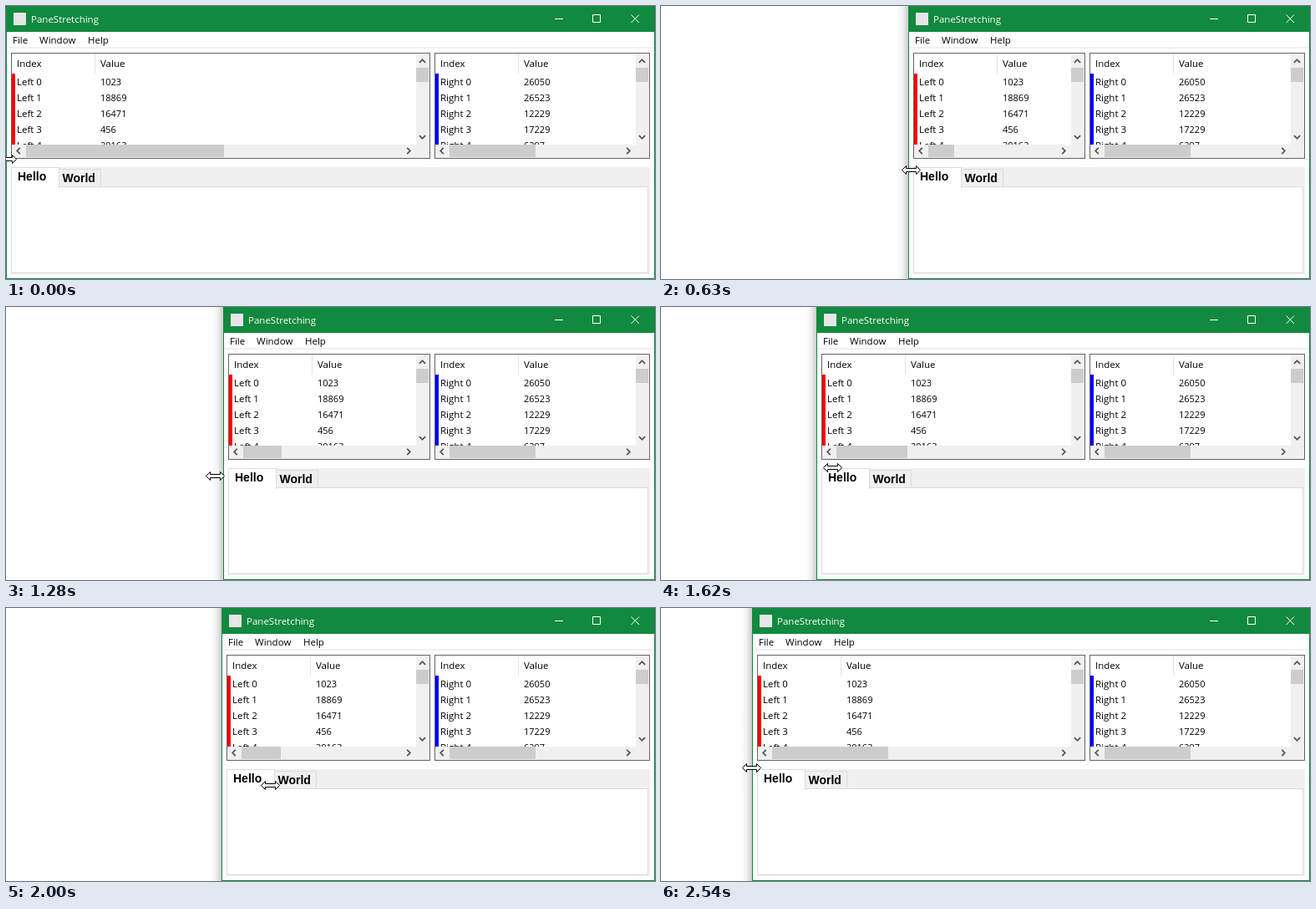
An HTML page that plays this animation: 777x327 px, repeating every 2.62 s.

```html
<!DOCTYPE html>
<html lang="en">
<head>
<meta charset="utf-8">
<title>Resizable window</title>
<style>
  html, body { margin: 0; width: 100%; height: 100%; overflow: hidden; background: #fff; }
  svg { display: block; width: 777px; height: 327px; }
  rect { shape-rendering: crispEdges; }
  text { font: 11.5px "Open Sans", "Noto Sans", sans-serif; white-space: pre; }
  .num { font-size: 11px; }
  .tab { font: bold 14px "Liberation Sans", Arial, sans-serif; }
  .chev { fill: none; stroke: #505050; stroke-width: 1.7; }
  .ctl { fill: none; stroke: #fff; }
</style>
</head>
<body>
<svg id="stage" viewBox="0 0 777 327"></svg>
<script>
const LOOP = 2620;
const GREEN = '#11893e', GREY = '#f0f0f0', THUMB = '#cdcdcd', EDGE = '#dcdcdc', FRAME = '#646464';

// time, window left edge, pointer x, pointer y
const KEYS = [
  [0, 0, 1.5, 183.5],
  [60, 6, 10, 184],
  [300, 150, 160, 190],
  [530, 279, 282, 195],
  [630, 296, 299.5, 196.5],
  [780, 338, 335, 196],
  [880, 264, 193.5, 193.5],
  [950, 135, 104, 193],
  [1030, 96, 95.5, 194],
  [1085, 96, 95.5, 194],
  [1190, 190, 215, 199],
  [1280, 260, 250.5, 202.5],
  [1370, 170, 150, 197],
  [1480, 108, 110, 192],
  [1620, 185, 204.5, 192.5],
  [1710, 254, 255, 196],
  [1860, 62, 60.5, 202],
  [2000, 257, 316.5, 212.5],
  [2065, 331, 325, 210],
  [2170, 184, 178, 200],
  [2300, 140, 136, 194],
  [2540, 109, 108.5, 191.5],
  [2620, 109, 108.5, 191.5]
];

const rect = (x, y, w, h, fill, more = '') =>
  `<rect x="${x}" y="${y}" width="${w}" height="${h}" fill="${fill}" ${more}/>`;
const box = (x, y, w, h, fill, stroke) => rect(x, y, w, h, stroke) + rect(x + 1, y + 1, w - 2, h - 2, fill);
const text = (x, y, s, cls = '', fill = '#000') => `<text x="${x}" y="${y}" class="${cls}" fill="${fill}">${s}</text>`;
const chev = (x, y, turn) =>
  `<path class="chev" d="M-3.6 1.8L0 -1.8L3.6 1.8" transform="translate(${x} ${y}) rotate(${turn})"/>`;

// Rectangles whose left side follows the window while the right side stays
const stretch = (x, y, right, h, fill) =>
  rect(x, y, right - x, h, fill, `class="stretch" data-x="${x}" data-r="${right}"`);
const stretchBox = (x, y, right, h, fill, stroke) =>
  stretch(x, y, right, h, stroke) + stretch(x + 1, y + 1, right - 1, h - 2, fill);

// Parts of a list anchored to its left side
function listBody(x, name, color, values) {
  let s = rect(x + 100, 57, 1, 24, '#e5e5e5') + rect(x + 1, 81, 4, 85, color) +
    text(x + 7, 73, 'Index') + text(x + 107, 73, 'Value');
  s += '<g clip-path="url(#rows)">';
  values.forEach((v, i) => {
    const y = 95 + 19 * i;
    s += text(x + 7, y, `${name} ${i}`) + text(x + 107, y, v, 'num');
  });
  return s + '</g>' + chev(x + 9, 173.5, -90);
}

// Parts of a list anchored to its right side
const listBars = r =>
  rect(r - 17, 57, 16, 109, GREY) + rect(r - 17, 74, 15, 17, THUMB) +
  chev(r - 9.5, 66, 0) + chev(r - 9.5, 157, 180) + chev(r - 26, 173.5, 90);

const stage = document.getElementById('stage');
stage.innerHTML = `
  <defs>
    <clipPath id="rows"><rect x="0" y="81" width="777" height="85"/></clipPath>
    <linearGradient id="shade">
      <stop offset="0" stop-color="#000" stop-opacity="0"/>
      <stop offset=".5" stop-color="#000" stop-opacity=".05"/>
      <stop offset="1" stop-color="#000" stop-opacity=".2"/>
    </linearGradient>
  </defs>` +
  stretchBox(0, 0, 777, 327, '#fff', GREEN) +
  stretch(0, 0, 777, 31, GREEN) +
  stretch(1, 49, 776, 2, GREY) +
  stretchBox(6, 56, 508, 127, '#fff', FRAME) +
  stretch(7, 166, 507, 16, GREY) +
  rect(24, 166, 237, 15, THUMB, 'id="thumb"') +
  stretch(6, 193, 771, 128, GREY) +
  stretchBox(6, 216, 769, 104, '#fff', EDGE) +
  '<g id="left">' +
    rect(-14, 0, 14, 327, 'url(#shade)') +
    rect(9, 8, 15, 15, '#e6e6e6') +
    text(30, 20, 'PaneStretching', '', '#fff') +
    text(8, 45, 'File') + text(40, 45, 'Window') + text(98, 45, 'Help') +
    listBody(6, 'Left', '#f00', ['1023', '18869', '16471', '456', '20163']) +
    box(63, 195, 51, 22, GREY, EDGE) +
    box(6, 193, 58, 25, '#fff', EDGE) + rect(7, 216, 56, 2, '#fff') +
    text(14, 209, 'Hello', 'tab') + text(67.5, 211, 'World', 'tab') +
  '</g>' +
  listBars(508) +
  box(513, 56, 258, 127, '#fff', FRAME) +
  rect(514, 166, 256, 16, GREY) + rect(531, 166, 103, 15, THUMB) +
  listBody(513, 'Right', '#00f', ['26050', '26523', '12229', '17229', '6297']) +
  listBars(771) +
  '<path class="ctl" d="M657 15.5h10M702.5 10.5h9v9h-9z"/>' +
  '<path class="ctl" d="M748.5 10.5l9.5 9.5M758 10.5l-9.5 9.5"/>' +
  `<path id="pointer" fill="#fff" stroke="#000" stroke-linejoin="round"
    d="M-11 0L-6 -5V-2H6V-5L11 0L6 5V2H-6V5Z"/>`;

const left = document.getElementById('left');
const thumb = document.getElementById('thumb');
const pointer = document.getElementById('pointer');
const stretched = [...stage.querySelectorAll('.stretch')];

const slope = (i, c) => (KEYS[i + 1][c] - KEYS[i][c]) / (KEYS[i + 1][0] - KEYS[i][0]);

// Tangent that never overshoots: flat at turning points
function tangent(i, c) {
  if (i === 0) return slope(0, c);
  if (i === KEYS.length - 1) return 0;
  const a = slope(i - 1, c), b = slope(i, c);
  return a * b <= 0 ? 0 : 2 * a * b / (a + b);
}

function valueAt(t, c) {
  let i = 0;
  while (i < KEYS.length - 2 && t >= KEYS[i + 1][0]) i++;
  const [p, q] = [KEYS[i], KEYS[i + 1]];
  const d = q[0] - p[0], u = (t - p[0]) / d, v = 1 - u;
  return p[c] * v * v * (1 + 2 * u) + q[c] * u * u * (3 - 2 * u) +
    d * u * v * (tangent(i, c) * v - tangent(i + 1, c) * u);
}

function draw(t) {
  const x = Math.round(valueAt(t, 1));
  left.setAttribute('transform', `translate(${x} 0)`);
  for (const el of stretched) {
    const x0 = +el.dataset.x + x;
    el.setAttribute('x', x0);
    el.setAttribute('width', el.dataset.r - x0);
  }
  thumb.setAttribute('x', x + 24);
  thumb.setAttribute('width', Math.round((449 - x) * (484 - x) / 917));
  const px = Math.floor(valueAt(t, 2)) + .5, py = Math.floor(valueAt(t, 3)) + .5;
  pointer.setAttribute('transform', `translate(${px} ${py})`);
}

const start = performance.now();
function tick() {
  draw((performance.now() - start) % LOOP);
  requestAnimationFrame(tick);
}
tick();
</script>
</body>
</html>
```
